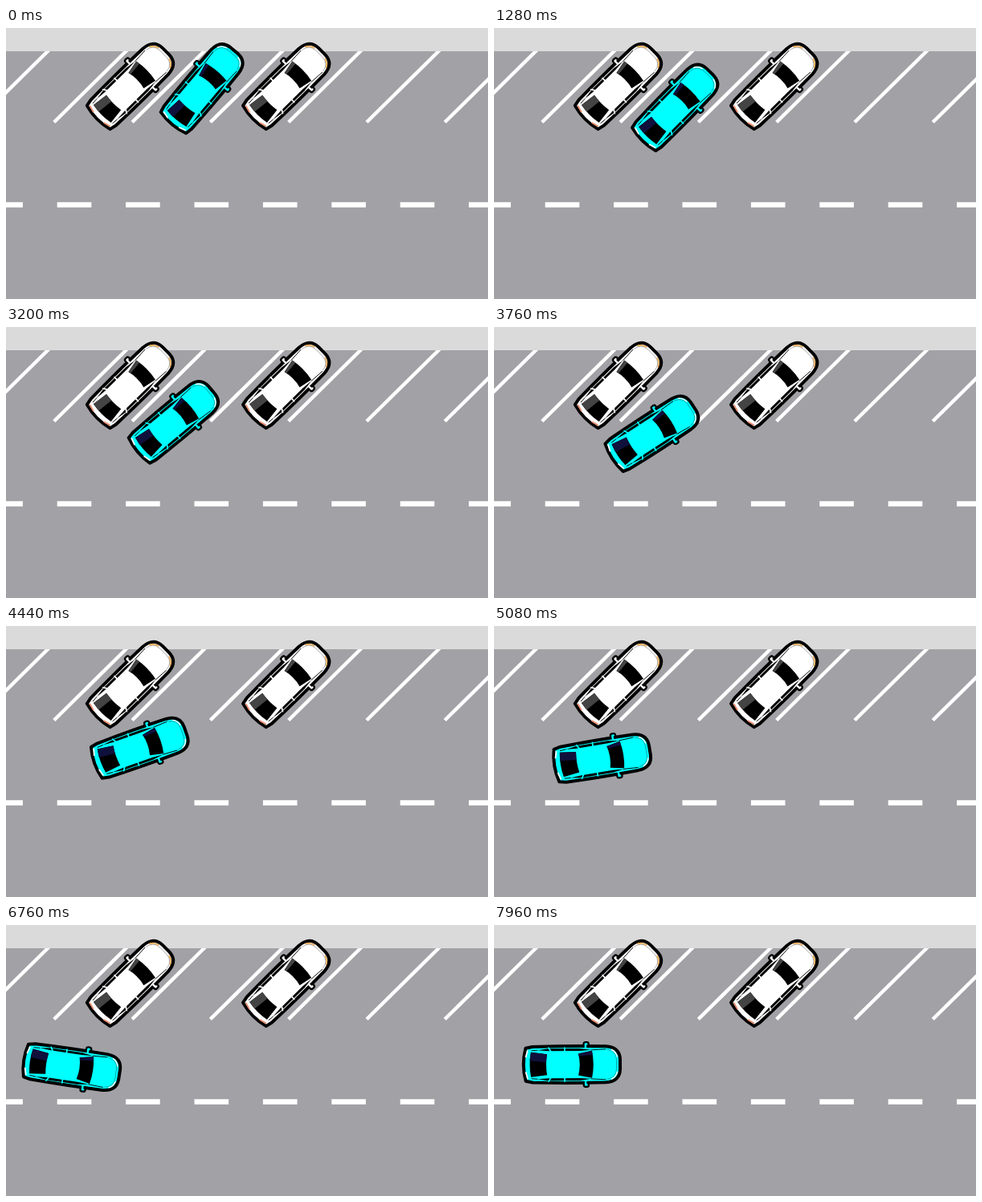
An HTML page that plays this animation: 600x338 px, repeating every 8000 ms.

```html
<!DOCTYPE html>
<html lang="en">
<head>
<meta charset="utf-8">
<title>Leaving an angled parking space</title>
<style>
  html, body { margin: 0; width: 100%; height: 100%; overflow: hidden; background: #a2a1a6; }
  svg { display: block; width: 100%; height: 100%; }
  .shell { fill: var(--paint); stroke: #000; stroke-width: 4; stroke-linejoin: round; }
  .line { fill: none; stroke: #000; stroke-linecap: round; stroke-linejoin: round; }
  .paint { stroke: var(--paint); }
  .white { --paint: #fff; --tint: #444; --lamp: #f0a23c; --tail: #e98a68; }
  .cyan { --paint: #0ff; --tint: #10103c; --lamp: #fff; --tail: #fff; }
</style>
</head>
<body>
<svg viewBox="0 0 600 338" preserveAspectRatio="none">
  <defs>
    <!-- Car centred on the origin, facing right -->
    <g id="car">
      <g id="mirror"><path class="line" d="M17 -21 V-25.5 H18.5" stroke-width="7"/></g>
      <use href="#mirror" transform="scale(1 -1)"/>
      <path class="shell" d="M-57.5 -20.5 L-49 -22.3 Q0 -23.5 42 -22.5 Q59.5 -21.5 60 -6 V6 Q59.5 21.5 42 22.5 Q0 23.5 -49 22.3 L-57.5 20.5 Q-63 0 -57.5 -20.5 Z"/>
      <path class="line" d="M44 -18.5 Q55 -17 55.5 -6 V6 Q55 17 44 18.5" stroke-width=".7" opacity=".45"/>
      <g id="half">
        <path class="line paint" d="M17 -20 V-25.5 H18.5" stroke-width="2.4"/>
        <path d="M-43 -18 L-29 -20 H10 L24 -18 L10 -17 H-29 Z"/>
        <path class="line paint" d="M-29 -21 L-26 -16 M-9 -21 V-16" stroke-width="1.8"/>
        <path class="line" d="M-50 -17.5 L-43 -18 M24 -18 L42 -19" stroke-width=".9"/>
        <path d="M49 -18.5 Q55 -16 56.5 -9" fill="none" stroke="var(--lamp)" stroke-width="1.4"/>
        <path d="M-55 -18 L-57.5 -9" fill="none" stroke="var(--tail)" stroke-width="1.8"/>
      </g>
      <use href="#half" transform="scale(1 -1)"/>
      <path d="M-51 -15.5 L-31 -13 Q-33 0 -31 13 L-51 15.5 Q-54 0 -51 -15.5 Z"/>
      <path d="M-51 -15.5 L-31 -13 L-32.2 -3 L-52.5 -5 Z" fill="var(--tint)"/>
      <path d="M8 -13.5 L25 -17 Q28.5 0 25 17 L8 13.5 Q11.5 0 8 -13.5 Z"/>
      <path d="M8 -13.5 L25 -17 L25.8 -12 L9 -10.5 Z" fill="var(--tint)"/>
    </g>
  </defs>
  <rect width="600" height="338" fill="#a2a1a6"/>
  <path id="bays" stroke="#fff" stroke-width="4.5"/>
  <rect width="600" height="29" fill="#dadada"/>
  <path d="M-21.7 220.5 H622" stroke="#fff" stroke-width="6.6" stroke-dasharray="42.6 42.8"/>
  <use href="#car" class="white" transform="translate(156.2 71.2) rotate(-44.5)"/>
  <use href="#car" class="white" transform="translate(350.4 71.2) rotate(-44.5)"/>
  <use href="#car" class="cyan" id="mover"/>
</svg>
<script>
const LOOP = 8000, TICK = 40, BAY = 97.3;

// Key poses: the car backs out, straightens up, then pulls forward
const poses = [
  { t: 0, x: 245.4, y: 74, turn: -50 },
  { t: 840, x: 230.2, y: 94.4, turn: -46 },
  { t: 2520, x: 219.5, y: 104.6, turn: -44.5 },
  { t: 3760, x: 197.8, y: 131.5, turn: -33 },
  { t: 4440, x: 167, y: 151.2, turn: -19.5 },
  { t: 5720, x: 108, y: 173, turn: -1.5 },
  { t: 7200, x: 78, y: 178, turn: 10 },
  { t: 7960, x: 97, y: 174, turn: -0.3 }
];

const slope = (i, key) =>
  (poses[i + 1][key] - poses[i][key]) / (poses[i + 1].t - poses[i].t);

// Monotone tangents: smooth, but never overshooting a stop
function tangent(i, key) {
  const last = poses.length - 1;
  const a = slope(Math.max(i - 1, 0), key), b = slope(Math.min(i, last - 1), key);
  return a * b <= 0 ? 0 : 2 * a * b / (a + b);
}

function valueAt(t, key) {
  let i = 0;
  while (i < poses.length - 2 && t >= poses[i + 1].t) i++;
  const p = poses[i], q = poses[i + 1], span = q.t - p.t;
  const u = (t - p.t) / span, v = 1 - u;
  return p[key] * v * v * (1 + 2 * u) + q[key] * u * u * (3 - 2 * u)
    + span * u * v * (v * tangent(i, key) - u * tangent(i + 1, key));
}

let bays = "";
for (let k = -1; k < 6; k++) bays += `M${59.8 + BAY * k} 117.5l92 -91`;
document.getElementById("bays").setAttribute("d", bays);

const mover = document.getElementById("mover");
const start = performance.now();

function draw(now) {
  const t = Math.floor(Math.max(0, now - start) % LOOP / TICK) * TICK;
  mover.setAttribute("transform",
    `translate(${valueAt(t, "x")} ${valueAt(t, "y")}) rotate(${valueAt(t, "turn")})`);
  requestAnimationFrame(draw);
}
draw(start);
</script>
</body>
</html>
```
